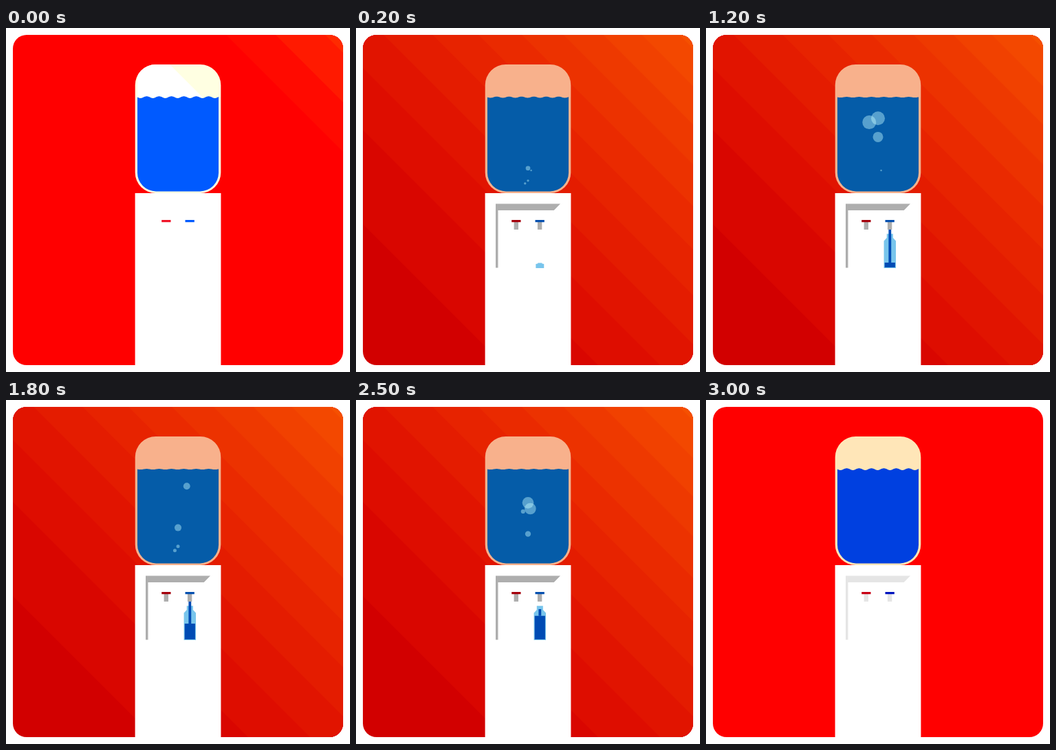
These frames come from a looping animation (500x500 px, 3100 ms). An HTML page with a canvas:

```html
<!DOCTYPE html>
<html lang="en">
<head>
<meta charset="utf-8">
<title>Water cooler</title>
<style>
html, body { margin: 0; width: 100%; height: 100%; overflow: hidden; background: #fff; }
canvas { display: block; width: 500px; height: 500px; }
</style>
</head>
<body>
<canvas id="stage" width="500" height="500"></canvas>
<script>
const ctx = document.getElementById('stage').getContext('2d');
const { PI, sin, cos, min, max, floor } = Math;
const LOOP = 3100, CYCLE = 3000, STEP = 100;

const clamp = v => max(0, min(1, v));
const lerp = (a, b, u) => a + (b - a) * u;

// The scene flashes around the loop point.
const NORMAL = { tank: '#f8b18c', water: '#055ca8', metal: '#aeaeae', hot: '#a5000c', cold: '#0550af' };
const BRIGHT = { tank: '#ffe6b8', water: '#0040e0', metal: '#e5e5e5', hot: '#c80014', cold: '#0014be', flash: 1 };
const BURNT = { tank: '#ffffe2', water: '#005aff', metal: '#ffffff', hot: '#f01428', cold: '#005aff', flash: 2 };

const BUBBLES = [
  { period: 1500, size: 12.5, sway: 0 },
  { period: 750, size: 12.5, sway: 0 },
  { period: 1500, size: 12.5, sway: -1 },
  { period: 1000, size: 6.2, sway: 1 }
];

const BASE = 349, AXIS = 267.3, SPOUT = 292;
const GLASS = '#78c5eb', DRINK = '#004bb4';

function rect(x, y, w, h, color) {
  ctx.fillStyle = color;
  ctx.fillRect(x, y, w, h);
}

function polygon(points, color) {
  ctx.beginPath();
  points.forEach(([x, y]) => ctx.lineTo(x, y));
  ctx.fillStyle = color;
  ctx.fill();
}

// Fills everything to the upper right of a 45 degree line.
function diagonal(edge, color) {
  polygon([[edge, 0], [500, 0], [500, 500], [edge + 500, 500]], color);
}

function drawBackground({ flash }) {
  rect(0, 0, 500, 500, flash ? '#f00' : 'rgb(210,0,0)');
  if (flash === 2) {
    for (let i = 0; i < 3; i++) diagonal(310 + 72 * i, `rgb(255,${10 + 16 * i},0)`);
  }
  if (flash) return;
  const bands = 11;
  for (let i = 0; i < bands; i++) {
    const edge = -275 + 735 * (i / (bands - 1)) ** .73;
    const u = (i + 1) / bands;
    diagonal(edge, `rgb(${210 + 35 * u ** .65},${80 * u ** 1.05},0)`);
  }
}

function drawTank(look, t) {
  ctx.save();
  ctx.beginPath();
  ctx.roundRect(187.7, 53, 124.6, 187, 30);
  ctx.fillStyle = look.tank;
  ctx.fill();
  if (look.flash === 2) {
    ctx.clip();
    polygon([[191, 53], [238, 53], [286, 101], [191, 101]], '#fff');
  }
  ctx.restore();

  const swell = .5 + .9 * cos(PI * t / CYCLE) ** 40;
  ctx.beginPath();
  for (let x = 191; x <= 309; x++) {
    ctx.lineTo(x, 100.6 - swell * cos(2 * PI * (x - 204.5) / 18));
  }
  ctx.arcTo(309, 237.4, 282, 237.4, 27);
  ctx.arcTo(191, 237.4, 191, 210, 27);
  ctx.closePath();
  ctx.fillStyle = look.water;
  ctx.fill();
}

function drawBubbles(t) {
  ctx.fillStyle = 'rgba(195,250,255,.43)';
  for (const { period, size, sway } of BUBBLES) {
    const u = t <= period ? t / period : t % period / period;
    const x = 250 + sway * (4.5 + 23 * u ** 3) * sin(2 * PI * u / .7);
    const y = 240 - 136 * u - 10 * sway * sin(PI * u);
    ctx.beginPath();
    ctx.arc(x, y, size * u, 0, 2 * PI);
    ctx.fill();
  }
}

function drawCabinet(look) {
  rect(187.6, 240, 124.8, 250, '#fff');
  polygon([[203, 255.6], [297, 255.6], [287.7, 265], [206.5, 265], [206.5, 348.5], [203, 348.5]], look.metal);
}

function drawTap(x, color, look) {
  rect(x + 3.4, 282, 6.4, 11, look.metal);
  rect(x, 279, 13.3, 3.2, color);
}

function bottleShape(grow) {
  const sx = lerp(.68, 1, grow), sy = lerp(.15, 1, grow);
  const side = [[4.5, 49.8], [4.5, 44], [8.7, 39.5], [8.7, 0]].map(([w, h]) => [w * sx, BASE - h * sy]);
  return [
    ...side.map(([w, y]) => [AXIS - w, y]),
    ...side.reverse().map(([w, y]) => [AXIS + w, y])
  ];
}

function drawBottle(t) {
  if (t < 200 || t >= CYCLE) return;
  const grow = 1 - (1 - clamp((t - 200) / 300)) ** 2;
  const leave = max(0, (t - 2550) / 350);
  const shape = bottleShape(grow);

  ctx.save();
  ctx.translate(174 * leave ** 2, -1.7 * min(1, leave));
  ctx.globalCompositeOperation = 'multiply';
  polygon(shape, GLASS);
  ctx.globalCompositeOperation = 'source-over';
  ctx.globalAlpha = .12;
  polygon(shape, GLASS);
  ctx.globalAlpha = 1;

  const filled = (1 - cos(PI * clamp((t - 570) / 2000))) / 2;
  const level = BASE - 35.4 * filled;
  const floorY = BASE - 1.1;
  if (level < floorY) rect(AXIS - 7.6, level, 15.2, floorY - level, DRINK);

  const head = min(level, SPOUT + 57 * clamp((t - 500) / 200) ** 2);
  const tail = SPOUT + 12 * max(0, (t - 2400) / 100) ** 2;
  if (head > tail) rect(AXIS - 1.9, tail, 3.8, head - tail, DRINK);
  ctx.restore();
}

function draw(t) {
  const look = t === 0 ? BURNT : t === 100 || t === CYCLE ? BRIGHT : NORMAL;
  ctx.clearRect(0, 0, 500, 500);
  ctx.save();
  ctx.beginPath();
  ctx.roundRect(10, 10, 480, 480, 20);
  ctx.clip();
  drawBackground(look);
  drawTank(look, t);
  drawBubbles(t);
  drawCabinet(look);
  drawBottle(t);
  drawTap(226.2, look.hot, look);
  drawTap(260.5, look.cold, look);
  ctx.restore();
}

// The motion is stepped at ten pictures a second.
function tick() {
  const now = (performance.now() + 8) % LOOP;
  draw(floor(now / STEP) * STEP);
  requestAnimationFrame(tick);
}
tick();
</script>
</body>
</html>
```
